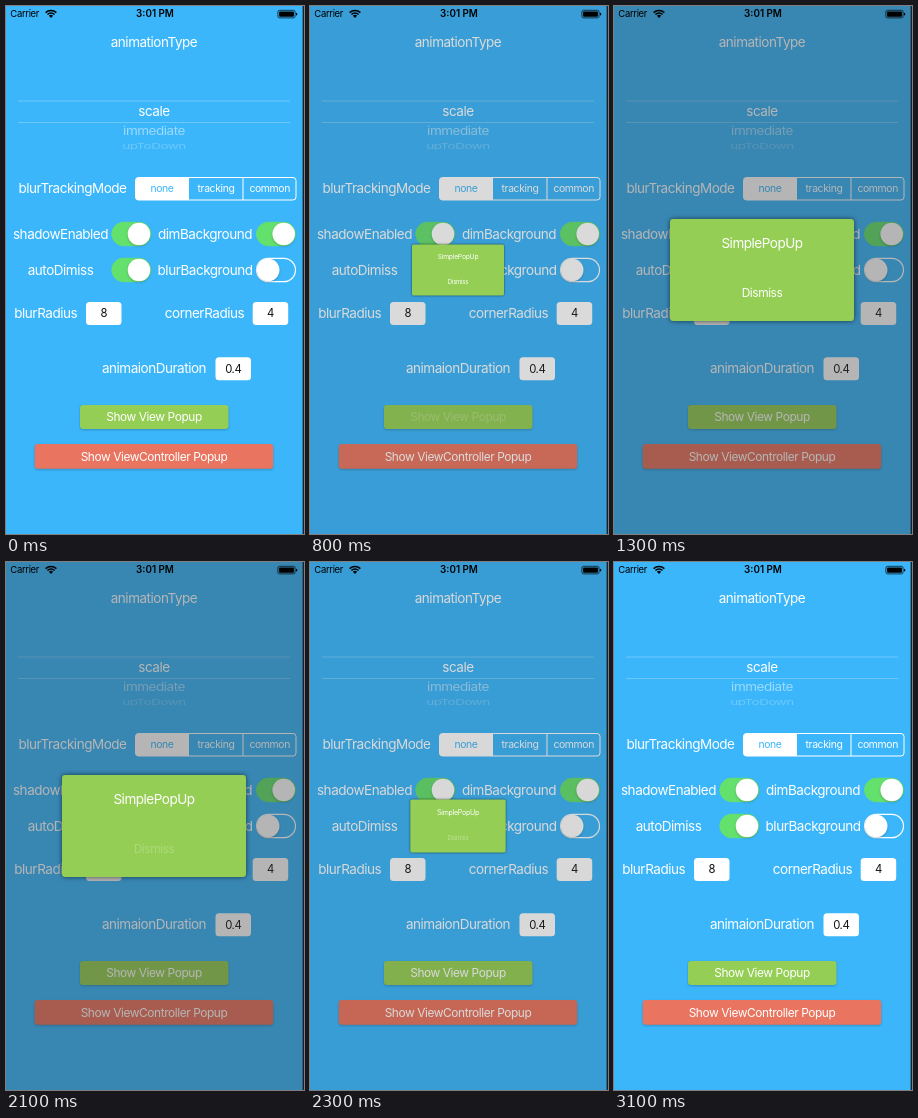
An HTML page that plays this animation: 298x528 px, repeating every 3.2 s.

```html
<!DOCTYPE html>
<html lang="en">
<head>
<meta charset="utf-8">
<title>Popup demo</title>
<style>
  html, body { margin: 0; width: 100%; height: 100%; overflow: hidden; background: #3bb6fb; }
  svg { display: block; width: 298px; height: 528px; }
  text {
    font: 13.5px Inter, "Liberation Sans", sans-serif;
    letter-spacing: -.035em; text-anchor: middle; fill: #fff;
  }
  .raised { filter: drop-shadow(0 1px 1.2px rgba(0, 0, 0, .22)); }
  #popup rect { filter: drop-shadow(0 0 2.5px rgba(0, 0, 0, .6)); }
</style>
</head>
<body>
<svg id="stage" viewBox="0 0 298 528"></svg>
<script>
const SKY = '#3bb6fb', LIME = '#94ce54', CORAL = '#e9745f', GREEN = '#64e06c';
const LOOP = 3200, STEP = 100;

const box = (x, y, w, h, r, attrs) =>
  `<rect x="${x}" y="${y}" width="${w}" height="${h}" rx="${r}" ${attrs}/>`;

// cy is the middle of the capitals
const label = (text, x, cy, size = 13.5, style = '', attrs = '') =>
  `<text x="${x}" y="${cy + size * .35}" style="font-size:${size}px;${style}" ${attrs}>${text}</text>`;

const toggle = (x, cy, on) =>
  box(x + .5, cy - 11.7, 39, 23.4, 11.7,
    on ? `fill="${GREEN}" stroke="${GREEN}"` : 'fill="none" stroke="#fff" stroke-width="1.2"') +
  `<circle class="raised" cx="${x + (on ? 27.7 : 12.2)}" cy="${cy}" r="11.3" fill="#fff"/>`;

const field = (text, x, cy) =>
  box(x, cy - 11.5, 35.5, 23, 3.5, 'fill="#fff"') +
  label(text, x + 17.75, cy, 11.3, 'fill:#111');

const button = (text, x, y, w, h, color, id) =>
  box(x, y, w, h, 3, `fill="${color}" class="raised"`) +
  label(text, 148, y + h / 2, 11.9, '', `id="${id}"`);

const pickerRow = (text, cy, squash, opacity) =>
  `<g transform="translate(148 ${cy}) scale(1 ${squash})" opacity="${opacity}">${label(text, 0, 0)}</g>`;

const picker =
  box(12, 94.6, 272, .8, 0, 'fill="#fff" opacity=".32"') +
  box(12, 116.1, 272, .8, 0, 'fill="#fff" opacity=".32"') +
  label('scale', 148, 105.3) +
  pickerRow('immediate', 124.5, .85, .5) +
  `<clipPath id="drum"><rect y="90" width="298" height="54"/></clipPath>
   <g clip-path="url(#drum)">${pickerRow('upToDown', 140.5, .6, .25)}</g>`;

const segments =
  box(129.5, 171.5, 160.5, 22.5, 3, 'fill="none" stroke="#fff"') +
  '<path d="M132.500 171.500H183V194H132.500a3 3 0 0 1-3-3V174.500a3 3 0 0 1 3-3zM236.500 171.500h1V194h-1z" fill="#fff"/>' +
  label('none', 156, 182.8, 10.4, `fill:${SKY}`) +
  label('tracking', 210, 182.8, 10.4) +
  label('common', 263.7, 182.8, 10.4);

const form =
  label('animationType', 148, 36.5) + picker +
  label('blurTrackingMode', 66.5, 182.5) + segments +
  label('shadowEnabled', 54.5, 228) + toggle(105.3, 228, true) +
  label('dimBackground', 199, 228) + toggle(250, 228, true) +
  label('autoDimiss', 54.5, 264) + toggle(105.3, 264, true) +
  label('blurBackground', 199, 264) + toggle(250, 264, false) +
  label('blurRadius', 39.7, 307.3) + field('8', 80, 307.5) +
  label('cornerRadius', 198.5, 307.3) + field('4', 246.700, 307.5) +
  label('animaionDuration', 148, 362.7) + field('0.4', 209.5, 362.7) +
  button('Show View Popup', 74, 399, 148.5, 24, LIME, 'show') +
  button('Show ViewController Popup', 28.7, 438, 238.5, 24.7, CORAL, 'controller');

const arc = r => {
  const d = r * Math.SQRT1_2;
  return `<path d="M${45 - d} ${12 - d}A${r} ${r} 0 0 1 ${45 + d} ${12 - d}"
    fill="none" stroke="#000" stroke-width="1.5"/>`;
};

const statusBar =
  label('Carrier', 18.7, 8, 9.5, 'fill:#000') +
  arc(7.6) + arc(5) + '<path d="M45 12l-2.100-2.200a3 3 0 0 1 4.200 0z"/>' +
  label('3:01 PM', 149, 8, 9.8, 'fill:#000;font-weight:600;letter-spacing:0') +
  box(271.900, 4.3, 17.2, 7.6, 1.7, 'fill="none" stroke="#000" stroke-width=".7"') +
  box(273.1, 5.5, 14.8, 5.2, .8, '') + box(290, 6.8, 1.2, 2.6, .6, '');

const popup = `<g id="popup">${box(-92, -51, 184, 102, 3.2, `fill="${LIME}"`)}
  ${label('SimplePopUp', 0, -26.700)}${label('Dismiss', 0, 23, 11.9, '', 'id="dismiss"')}</g>`;

document.getElementById('stage').innerHTML =
  box(0, 0, 298, 528, 0, `fill="${SKY}"`) + form +
  box(0, 0, 298, 528, 0, 'id="dim" fill="#323232"') +
  popup + statusBar + box(296.6, 0, 1.4, 528, 0, 'fill="#17222b"');

const [dimEl, popupEl, showEl, dismissEl] =
  ['dim', 'popup', 'show', 'dismiss'].map(id => document.getElementById(id));

const smooth = k => k * k * (3 - 2 * k);

// Eased value from [time, value] keys
function track(keys, t) {
  const i = keys.findIndex(k => k[0] > t);
  if (i < 0) return keys[keys.length - 1][1];
  if (i === 0) return keys[0][1];
  const [t0, a] = keys[i - 1], [t1, b] = keys[i];
  return a + (b - a) * smooth((t - t0) / (t1 - t0));
}

const OPEN = [[700, 0], [900, 1], [2105, 1], [2505, 0]];
const SHOW_TEXT = [[450, 1], [550, .25], [900, .25], [1300, 1]];
const DISMISS_TEXT = [[1950, 1], [2050, .22], [2150, .22], [2600, .8]];

function draw() {
  const t = Math.floor(performance.now() % LOOP / STEP) * STEP;
  const open = track(OPEN, t);
  dimEl.setAttribute('opacity', .36 * open);
  popupEl.setAttribute('transform', `translate(148 264) scale(${open})`);
  popupEl.setAttribute('visibility', open > .005 ? 'visible' : 'hidden');
  showEl.setAttribute('opacity', track(SHOW_TEXT, t));
  dismissEl.setAttribute('opacity', track(DISMISS_TEXT, t));
  requestAnimationFrame(draw);
}
draw();
</script>
</body>
</html>
```
